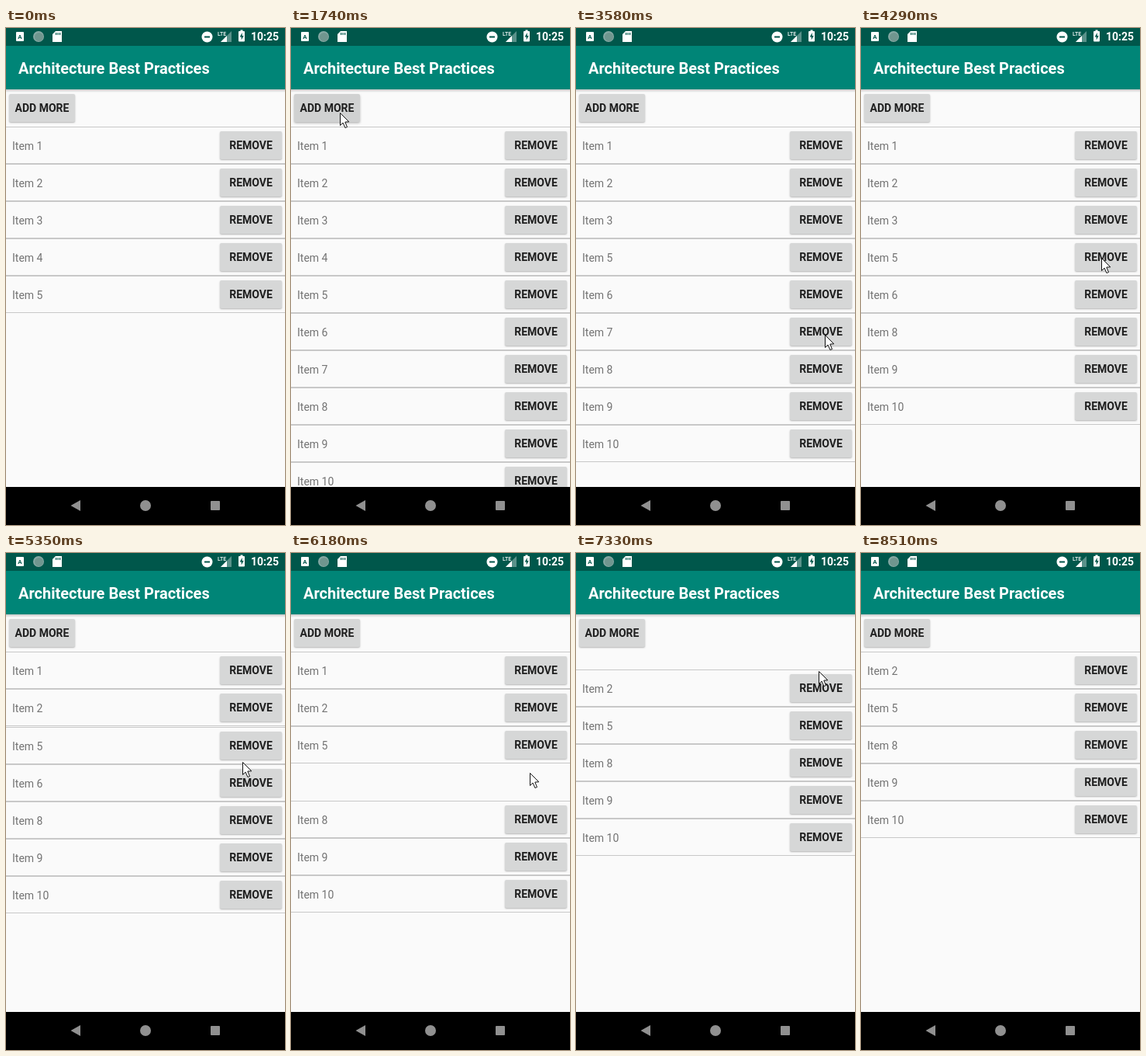
Animation, 360 px wide and 640 px high, one loop 9.18 s. Source, as an HTML page with a canvas:

```html
<!DOCTYPE html>
<html lang="en">
<head>
<meta charset="utf-8">
<title>Item list</title>
<style>
  html, body { margin: 0; width: 100%; height: 100%; overflow: hidden; background: #fafafa; }
  canvas { display: block; width: 360px; height: 640px; }
</style>
</head>
<body>
<canvas id="stage" width="360" height="640"></canvas>
<script>
const ctx = document.getElementById('stage').getContext('2d');
const LOOP = 9180, LIST_TOP = 127, ROW = 48, ITEMS = 10, FIRST_ITEMS = 5;
const ADD_PRESS = 1280, FADE = 120, SLIDE = 202, PRESS_LEAD = 200;

// When the rows below a removed item start closing its gap
const removedAt = { 4: 3038, 7: 4083, 3: 5168, 6: 6180, 1: 7228 };

// Pointer stops: arrival time, x, y
const stops = [
  [0, 290, 628],
  [900, 63, 109],
  [2390, 312, 309],
  [3230, 313, 366],
  [3590, 321, 395],
  [4480, 304, 243],
  [5340, 305, 269],
  [5700, 307, 301],
  [6540, 313, 152],
  [8160, 187, 127],
];
const POINTER_IN = 260, EXIT_START = 8300, POINTER_OUT = 8510;

const progress = (t, a, b) => Math.min(1, Math.max(0, (t - a) / (b - a)));
const ease = u => (1 - Math.cos(u * Math.PI)) / 2;

function rect(x, y, w, h, color) {
  ctx.fillStyle = color;
  ctx.fillRect(x, y, w, h);
}

function shape(path, color) {
  ctx.fillStyle = color;
  ctx.fill(new Path2D(path));
}

function circle(x, y, r, color) {
  ctx.beginPath();
  ctx.arc(x, y, r, 0, Math.PI * 2);
  ctx.fillStyle = color;
  ctx.fill();
}

function roundRect(x, y, w, h, r, color) {
  ctx.beginPath();
  ctx.roundRect(x, y, w, h, r);
  ctx.fillStyle = color;
  ctx.fill();
}

function text(string, x, y, size, weight, color, align = 'left') {
  ctx.font = `${weight} ${size}px Roboto, sans-serif`;
  ctx.textAlign = align;
  ctx.fillStyle = color;
  ctx.fillText(string, x, y);
}

// Highlight of a button pressed at the given time
const pressAmount = (t, press) =>
  progress(t, press - 20, press + 60) * (1 - progress(t, press + 180, press + 540));

function button(label, x, y, w, pressed) {
  ctx.save();
  ctx.shadowColor = 'rgba(0,0,0,.28)';
  ctx.shadowBlur = 2 + 4 * pressed;
  ctx.shadowOffsetY = 1 + 2 * pressed;
  roundRect(x, y, w, 36, 2, '#d6d7d7');
  ctx.restore();
  roundRect(x, y, w, 36, 2, `rgba(0,0,0,${0.12 * pressed})`);
  text(label, x + w / 2, y + 23, 14, 600, '#1f1f1f', 'center');
}

function drawRow(n, t) {
  const slide = m => ease(progress(t, removedAt[m], removedAt[m] + SLIDE));
  const gapsClosed = Object.keys(removedAt)
    .filter(m => m < n)
    .reduce((sum, m) => sum + slide(m), 0);
  const y = Math.round(LIST_TOP + ROW * (n - 1 - gapsClosed));

  let alpha = n > FIRST_ITEMS ? progress(t, ADD_PRESS + FADE, ADD_PRESS + 2 * FADE) : 1;
  let pressed = 0;
  if (removedAt[n]) {
    alpha *= 1 - progress(t, removedAt[n] - FADE, removedAt[n]);
    pressed = pressAmount(t, removedAt[n] - PRESS_LEAD);
  }
  if (!alpha) return;

  ctx.globalAlpha = alpha;
  rect(0, y, 360, 1, '#c8c8c8');
  rect(0, y + ROW - 1, 360, 1, '#c8c8c8');
  text('Item ' + n, 8, y + 30, 14, 400, '#737373');
  button('REMOVE', 276, y + 6, 80, pressed);
  ctx.globalAlpha = 1;
}

function drawStatusBar() {
  const white = '#fff', bar = '#00574b';
  rect(0, 0, 360, 23, bar);
  roundRect(13, 5, 10, 12, 1, white);
  text('A', 18, 14, 8, 700, bar, 'center');
  circle(42, 11, 7, '#86a9a4');
  circle(42.5, 11.5, 5.5, '#70968f');
  shape('M64 4h8v14h-12V8z', white);
  for (let x = 64; x < 70; x += 2.5) rect(x, 6, 1.2, 3, bar);
  circle(259.5, 11.5, 7, white);
  rect(256, 10.5, 7, 2, bar);
  text('LTE', 273, 10, 7, 500, white);
  shape('M291 4v14h-14z', 'rgba(255,255,255,.35)');
  shape('M285 10v8h-8z', white);
  rect(302.5, 2.5, 3, 2, white);
  roundRect(300, 4, 8, 13.5, 1, white);
  shape('M304.7 6l-3 5.5h2v4l3-5.5h-2z', bar);
  text('10:25', 352, 16, 14, 600, white, 'right');
}

function drawAppBar() {
  const shadow = ctx.createLinearGradient(0, 79, 0, 83);
  shadow.addColorStop(0, 'rgba(0,0,0,.2)');
  shadow.addColorStop(1, 'rgba(0,0,0,0)');
  rect(0, 79, 360, 4, shadow);
  rect(0, 23, 360, 56, '#008577');
  text('Architecture Best Practices', 16, 59, 20, 600, '#fff');
}

function drawNavBar() {
  const gray = '#909090';
  rect(0, 591, 360, 49, '#000');
  shape('M83.5 615l12.5-7v14z', gray);
  circle(180, 615, 7, gray);
  roundRect(264, 609, 12, 12, 1, gray);
}

// Longer ways take longer, but only with the root of the distance
function pointerAt(t) {
  let [, x, y] = stops[0];
  for (const [arrival, toX, toY] of stops.slice(1)) {
    const duration = Math.min(600, 38 * Math.sqrt(Math.hypot(toX - x, toY - y)));
    if (t < arrival - duration) break;
    const u = ease(progress(t, arrival - duration, arrival));
    x += (toX - x) * u;
    y += (toY - y) * u;
    if (u < 1) break;
  }
  const exit = ease(progress(t, EXIT_START, POINTER_OUT));
  return [x + 127 * exit, y + 498 * exit];
}

function drawPointer(t) {
  if (t < POINTER_IN || t >= POINTER_OUT) return;
  const [x, y] = pointerAt(t);
  const arrow = new Path2D('M0 0v16l3.6-3.4 2.8 6.4 2.6-1-2.7-6.4 5-.3z');
  ctx.save();
  ctx.translate(Math.round(x) + 0.5, Math.round(y) + 0.5);
  ctx.fillStyle = '#fff';
  ctx.fill(arrow);
  ctx.strokeStyle = '#111';
  ctx.stroke(arrow);
  ctx.restore();
}

function draw(t) {
  rect(0, 0, 360, 640, '#fafafa');
  for (let n = 1; n <= ITEMS; n++) drawRow(n, t);
  drawAppBar();
  button('ADD MORE', 4, 85, 85, pressAmount(t, ADD_PRESS));
  drawStatusBar();
  drawNavBar();
  drawPointer(t);
}

const startTime = performance.now();
function tick() {
  draw((performance.now() - startTime) % LOOP);
  requestAnimationFrame(tick);
}
tick();
</script>
</body>
</html>
```
